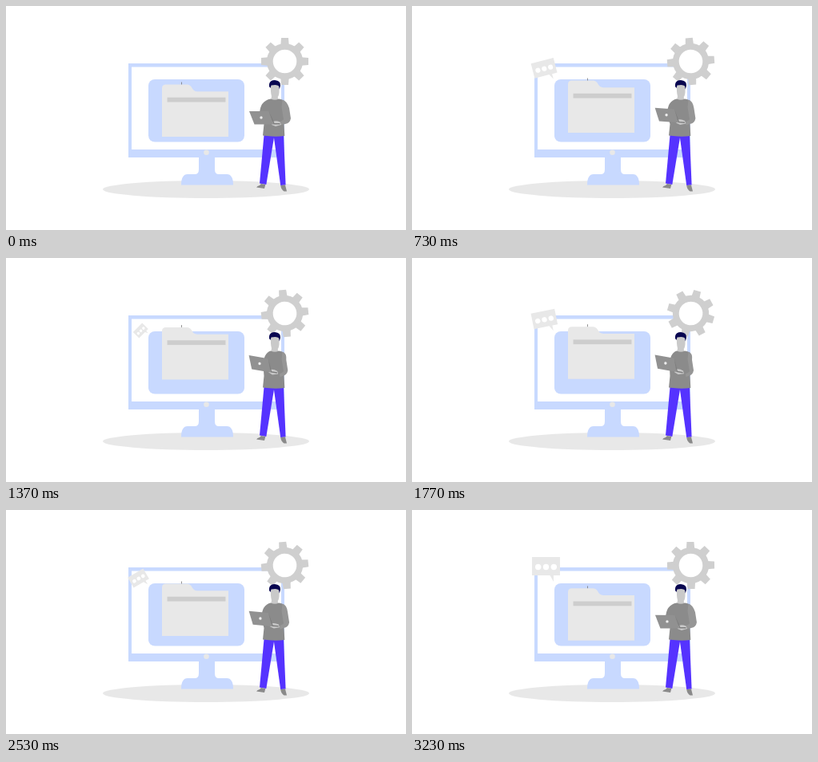
These frames come from a looping animation (500x281 px, 3.27 s). An HTML page:

```html
<!DOCTYPE html>
<html lang="en">
<head>
<meta charset="utf-8">
<title>Sharing files at work</title>
<style>
html, body { margin: 0; width: 100%; height: 100%; overflow: hidden; background: #fff; }
svg { display: block; width: 100%; height: 100%; }
</style>
</head>
<body>
<svg viewBox="0 0 500 281" preserveAspectRatio="xMidYMid meet">
  <rect width="500" height="281" fill="#fff"/>
  <ellipse cx="250" cy="230" rx="129" ry="11" fill="#e8e8e8"/>

  <g id="monitor" fill="#c8d9ff">
    <path d="M219 224.5Q219 211 227 211H236Q241 211 241 205V189H261V205Q261 211 266 211H276Q284 211 284 224.5Z"/>
    <path fill-rule="evenodd" d="M153 72H348V190H153ZM157 76.5V180H344V76.5Z"/>
    <circle cx="250.5" cy="183.8" r="3.3" fill="#e8e8e8"/>
    <rect x="178" y="92" width="120" height="78.5" rx="8"/>
  </g>

  <g id="folder">
    <path d="M219.5 95.5V99" stroke="#777" stroke-width=".8"/>
    <path d="M195 103Q195 98.5 200 98.5H226Q230 98.5 232 102Q234.500 107.200 239 107.200H278V164H195Z" fill="#e8e8e8"/>
    <rect x="201.500" y="114.700" width="73" height="5.800" fill="#cdcdcd"/>
  </g>

  <g id="bubble">
    <path d="M150 59H185V82H177V90L172.500 82H150Z" fill="#e8e8e8"/>
    <g fill="#fff">
      <circle cx="157.700" cy="71.500" r="3.700"/>
      <circle cx="167.500" cy="71.500" r="3.700"/>
      <circle cx="177.300" cy="71.500" r="3.700"/>
    </g>
  </g>

  <g id="gear" fill="#cfcfcf">
    <circle r="18.700" fill="#fff" stroke="#cfcfcf" stroke-width="7.800"/>
  </g>

  <g id="man">
    <path d="M322.500 162H335.500L325.300 224L317 222.500Z" fill="#5533ff"/>
    <path d="M334.500 162H347L349.600 224.500L343.200 225Z" fill="#5533ff"/>
    <path d="M319 223L324.300 224L323 229L313 227.500Q314 225.500 317 225Z" fill="#8a8a8a"/>
    <path d="M343.300 225L349 224.500L351 232.500L347.500 232.500Q343.500 230 343.300 225Z" fill="#8a8a8a"/>
    <path d="M331 98H341.500V108Q341 113 339.700 114L340.500 118.500H331L332 113.500Q330.500 108 331 98Z" fill="#c9c9c9"/>
    <path d="M329 98Q330 93 336 93Q343.500 93.500 343 100L341.800 104.500L341 100.500Q339 98 331.500 99.500L330.500 103Q328.300 101 329 98Z" fill="#080650"/>
    <path id="torso" fill="#8b8b8b"/>
    <path id="sleeve" fill="#969696"/>
    <g id="laptop">
      <path d="M332 146Q336 143 342.500 145.500L344 149L337 151L332 149Z" fill="#c9c9c9"/>
      <path d="M304 132H328.500L334.500 148.500H310.500Z" fill="#919191"/>
      <path d="M328.500 132L334.500 148.500H342.500V147H335.500Z" fill="#7d7d7d"/>
      <circle cx="319" cy="140" r="1.700" fill="#eee"/>
    </g>
  </g>
</svg>
<script>
const LOOP = 3270, CYCLE = 3350, POP = 1000, POPS = 3;
const el = id => document.getElementById(id);
const set = (id, name, value) => el(id).setAttribute(name, value);
const move = (id, value) => set(id, 'transform', value);

for (let i = 0; i < 8; i++) {
  const tooth = document.createElementNS('http://www.w3.org/2000/svg', 'path');
  tooth.setAttribute('d', 'M-4.500 -29.500H4.500L5.200 -20H-5.200Z');
  tooth.setAttribute('transform', `rotate(${i * 45})`);
  el('gear').append(tooth);
}

// The pop repeats three times, then the bubble rests at full size.
function popScale(t) {
  if (t >= POP * POPS) return 1;
  return 1 - Math.pow(1 - t % POP / POP, 1.35);
}

function draw(t) {
  const u = t / CYCLE;
  const lift = (1 - Math.cos(2 * Math.PI * u)) / 2;
  const spin = (1 - Math.cos(Math.PI * u)) / 2;
  const s = popScale(t);

  move('folder', `translate(0 ${-12.4 * lift})`);
  move('gear', `translate(348.500 69.500) rotate(${360 * spin})`);
  move('bubble', `translate(180.500 94.500) rotate(${-85 * (1 - s)}) scale(${s}) translate(-180.500 -94.500)`);
  move('laptop', `translate(${-4 * lift} ${-3.5 * lift}) rotate(${10.5 * lift} 345 148)`);

  const left = 317 + 5 * lift, elbow = 356 - 4 * lift;
  set('torso', 'd', `M331 116.500Q336 119 341 116.500Q349 117.500 350 124L347.500 148L348.300 163Q335 164.500 321 162.500L322.500 148L${left} 136Q${left} 119 331 116.500Z`);
  set('sleeve', 'd', `M345.500 117.500Q351 119 ${elbow - 2} 128L${elbow} 141Q${elbow - 1} 147 ${elbow - 7} 148L342.500 149.500L342 145.500L347 142.500L344.500 127Z`);
}

const start = performance.now();
function frame() {
  draw((performance.now() - start) % LOOP);
  requestAnimationFrame(frame);
}
draw(0);
requestAnimationFrame(frame);
</script>
</body>
</html>
```
